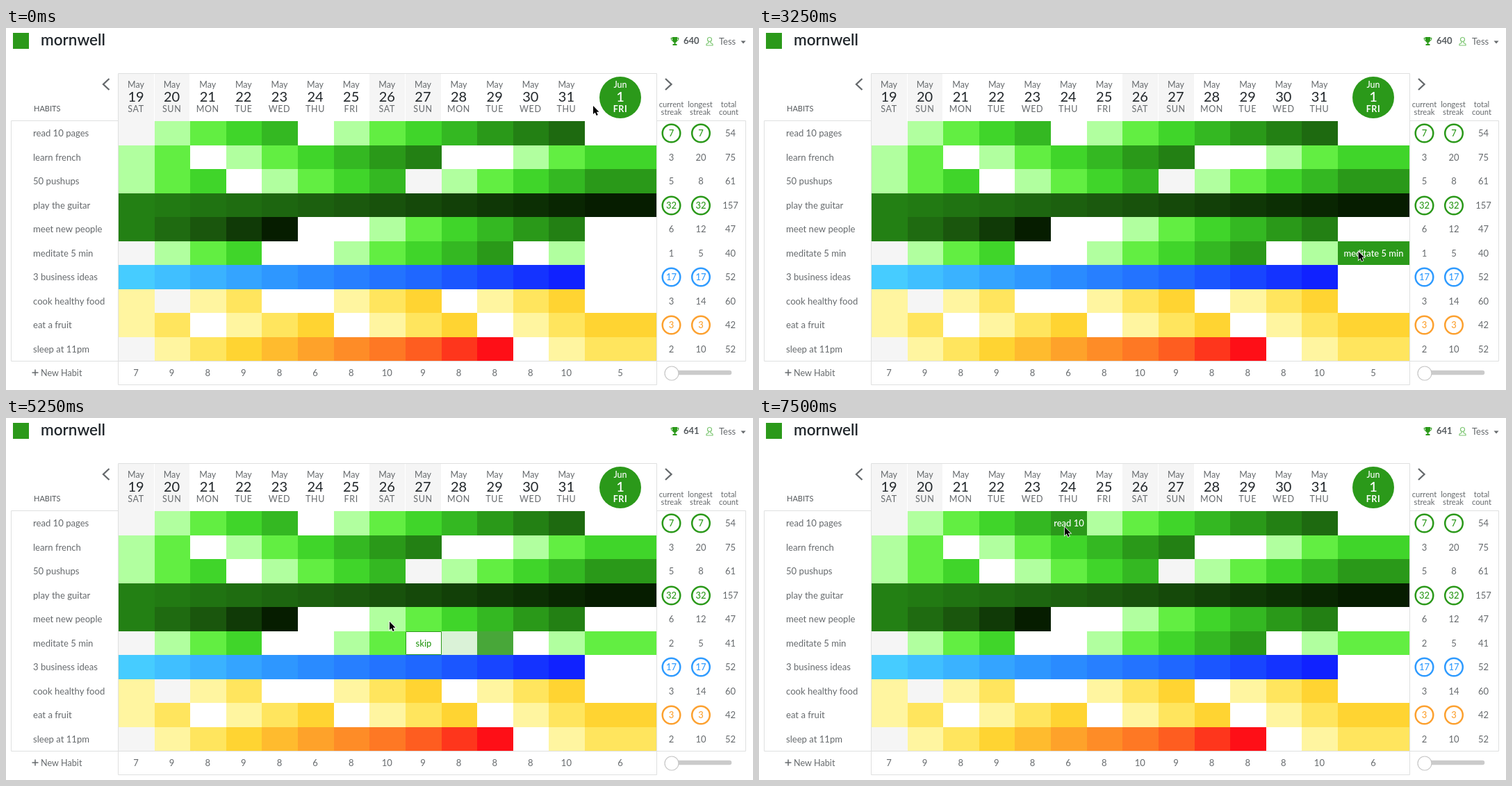
An HTML page with a canvas that plays this animation: 1075x521 px, repeating every 8000 ms.

```html
<!DOCTYPE html>
<html lang="en">
<head>
<meta charset="utf-8">
<title>Habit board</title>
<style>
html, body { margin: 0; width: 100%; height: 100%; overflow: hidden; background: #fff; }
canvas { display: block; }
</style>
</head>
<body>
<canvas id="stage" width="1075" height="521"></canvas>
<script>
const ctx = document.getElementById('stage').getContext('2d');
const LOOP = 8000, STEP = 250, FADE = 250, LAG = 100, CLICK = 3750, TODAY = 13;
const GREEN = '#2b991a', BLUE = '#2f9bff', ORANGE = '#fca130', GRAY = '#666a6d', LINE = '#dfe0e0';

// Evenly spaced colours through the given stops.
function ramp(stops, n) {
  const rgb = stops.map(s => [1, 3, 5].map(i => parseInt(s.substr(i, 2), 16)));
  return Array.from({ length: n }, (_, i) => {
    const p = i / (n - 1) * (stops.length - 1), k = Math.min(Math.floor(p), stops.length - 2);
    return `rgb(${rgb[k].map((v, c) => Math.round(v + (rgb[k + 1][c] - v) * (p - k)))})`;
  });
}
const fresh = ['#b1ff9f', '#62ee42', '#40d52a', '#34b822', '#2a9919', '#238014', '#1e6a10'];
const warm = ['#fff5a0', '#ffe55e', ...ramp(['#ffd432', '#fe9a29', '#fe6a22', '#fe0f17'], 8)];
const deep = ['#238014', '#1a560d', '#061d00'];
const blues = ['#46ccff', '#2e97ff', '#1f67ff', '#1022ff'];

// before: streak length already reached on the first day shown; carried: its colour stops.
const habits = [
  { label: 'read 10 pages', days: '.xxxx.xxxxxxx.', longest: 7, total: 54 },
  { label: 'learn french', days: 'xx.xxxxxx..xxx', longest: 20, total: 75 },
  { label: '50 pushups', days: 'xxx.xxxx.xxxxx', longest: 8, total: 61 },
  { label: 'play the guitar', days: 'xxxxxxxxxxxxxx', longest: 32, total: 157, before: 18, carried: deep },
  { label: 'meet new people', days: 'xxxxx..xxxxxx.', longest: 12, total: 47, before: 6, carried: deep },
  { label: 'meditate 5 min', days: '.xxx..xxxxx.x.', longest: 5, total: 40, clicked: true },
  { label: '3 business ideas', days: 'xxxxxxxxxxxxx.', longest: 17, total: 52, before: 4, carried: blues, accent: BLUE },
  { label: 'cook healthy food', days: 'x.xx..xxx.xxx.', longest: 14, total: 60, palette: warm, accent: ORANGE },
  { label: 'eat a fruit', days: 'xx.xxx.xxx.xxx', longest: 3, total: 42, palette: warm, accent: ORANGE },
  { label: 'sleep at 11pm', days: '.xxxxxxxxxx.xx', longest: 10, total: 52, palette: warm, accent: ORANGE },
];
const weekdays = ['SAT', 'SUN', 'MON', 'TUE', 'WED', 'THU', 'FRI'];

// Pointer route: time, x, y of the tip.
const route = [
  [500, 845, 112], [1500, 871, 201], [1650, 871, 240], [2000, 868, 272], [2250, 865, 279],
  [3000, 862, 321], [CLICK, 864, 323], [4250, 857, 378], [4750, 780, 387], [4900, 690, 338],
  [5113, 626, 316], [5250, 552, 293], [5750, 390, 203], [6000, 366, 181], [6250, 345, 177], [7000, 440, 157],
];

const colX = c => c > TODAY ? 936 : Math.round(162 + 51.615 * c);
const rowY = r => Math.round(134 + 34.5 * r);
const colMid = c => c < TODAY ? 187 + 51.615 * c : 884;
const isWeekend = c => c % 7 < 2;
const isDone = (habit, c, t) => habit.days[c] === 'x' || habit.clicked && c === TODAY && t >= CLICK;

function pointerAt(t) {
  const k = route.findIndex(p => p[0] > t);
  if (k < 1) return (k ? route[route.length - 1] : route[0]).slice(1);
  const [a, b] = [route[k - 1], route[k]], p = (t - a[0]) / (b[0] - a[0]);
  return [1, 2].map(i => a[i] + (b[i] - a[i]) * p);
}

function text(s, x, y, size = 13, color = GRAY, align = 'center', weight = 400, spacing = 0) {
  ctx.font = `${weight} ${size}px Lato, sans-serif`;
  ctx.letterSpacing = spacing + 'px';
  ctx.textAlign = align;
  ctx.fillStyle = color;
  ctx.fillText(s, x, y);
}
function rect(x, y, w, h, color) {
  ctx.fillStyle = color;
  ctx.fillRect(x, y, w, h);
}
function path(d, fill, stroke, width = 1) {
  const p = new Path2D(d);
  if (stroke) { ctx.strokeStyle = stroke; ctx.lineWidth = width; ctx.stroke(p); }
  if (fill) { ctx.fillStyle = fill; ctx.fill(p); }
}
function circle(x, y, r, fill, stroke, width) {
  ctx.beginPath();
  ctx.arc(x, y, r, 0, 7);
  if (fill) { ctx.fillStyle = fill; ctx.fill(); }
  if (stroke) { ctx.strokeStyle = stroke; ctx.lineWidth = width; ctx.stroke(); }
}

function drawTop(t) {
  rect(10, 7, 23, 23, GREEN);
  text('mornwell', 50, 25, 22.5, '#22282d', 'left', 600);
  path('M959 13h7v4q0 3-2.5 4v2h2v2h-6v-2h2v-2q-2.5-1-2.5-4z', GREEN);
  path('M959 14.5h-2q0 4 3 4M966 14.5h2q0 4-3 4', null, GREEN);
  text(t < CLICK ? 640 : 641, 975, 23, 13, '#555a5e', 'left', 700);
  circle(1012.5, 16.5, 3, null, '#7cc672', 1.2);
  path('M1011 19.5v2l-3 1.5v2h9v-2l-3-1.5v-2', null, '#7cc672', 1.2);
  text('Tess', 1026, 23.5, 13, GRAY, 'left');
  path('M1057.5 18.5h7l-3.5 4z', GRAY);
}

function drawHeader() {
  path('M148.5 73l-8.500 8 8.500 8M949 73l8.500 8-8.500 8', null, '#65696c', 2.3);
  text('HABITS', 40, 120, 11, '#55595c', 'left');
  [['current', 'streak', 957.5], ['longest', 'streak', 999], ['total', 'count', 1040]]
    .forEach(([a, b, x]) => { text(a, x, 114, 11.2); text(b, x, 125, 11.2); });
  circle(884, 100, 30, GREEN);
  for (let c = 0; c <= TODAY; c++) {
    const x = colX(c), mid = colMid(c), today = c === TODAY, soft = today ? '#fff' : GRAY;
    if (isWeekend(c) && !today) rect(x, 66, colX(c + 1) - x - 1, 68, '#f5f5f5');
    text(today ? 'Jun' : 'May', mid, today ? 85.5 : 86, 12.5, soft, 'center', today ? 500 : 400);
    text(today ? 1 : 19 + c, mid, 105.7, 20, today ? '#fff' : '#22272b', 'center', today ? 500 : 400);
    text(weekdays[c % 7], mid, 121.3, 12.5, soft, 'center', today ? 700 : 400, .6);
  }
}

function drawBorders() {
  path('M161.5 134V65.5H936.5V134M7.5 133.5H161.5M936.5 133.5H1064.5V479.5H7.5V133.5' +
    'M161.5 479.5V513.5H936.5V479.5M161.5 134V479.5M936.5 134V479.5', null, LINE);
}

function drawRow(habit, r, t) {
  const { label, days, longest, total, before = 0, carried, accent = GREEN, palette = fresh } = habit;
  const y = rowY(r), h = rowY(r + 1) - y, base = y + 21.5;
  const firstGap = (days + '.').indexOf('.'), old = carried && ramp(carried, firstGap);
  let streak = before, current = 0;
  text(label, 39, base, 13.1, GRAY, 'left');
  for (let c = 0; c <= TODAY; c++) {
    const done = isDone(habit, c, t);
    streak = done ? streak + 1 : 0;
    if (done || c < TODAY) current = streak;
    const blank = isWeekend(c) && c < TODAY ? '#f5f5f5' : '#fff';
    const color = !done ? blank : old && c < firstGap ? old[c] : palette[streak - 1];
    rect(colX(c), y, colX(c + 1) - colX(c), h, color);
  }
  const added = habit.clicked && t >= CLICK ? 1 : 0;
  [current, longest, total + added].forEach((n, i) => {
    const x = 957.5 + 42.5 * i, ring = current === longest && i < 2;
    if (ring) circle(x, y + 17.5, 12.8, null, accent, 2.5);
    text(n, x, base + .5, 13, ring ? accent : GRAY, 'center', ring ? 500 : 400);
  });
}

function drawFooter(t) {
  path('M37.5 496h9M42 491.5v9', null, GRAY, 1.5);
  text('New Habit', 50, 500.5, 12.6, GRAY, 'left');
  for (let c = 0; c <= TODAY; c++) text(habits.filter(habit => isDone(habit, c, t)).length, colMid(c), 501);
  ctx.lineCap = 'round';
  path('M958 496h83', null, '#cbcbcb', 6.5);
  ctx.lineCap = 'butt';
  circle(958, 497, 10, '#fff', '#c6c6c6', 1.2);
}

function drawHoverCell(r, c, cover) {
  const { label, days, accent = GREEN } = habits[r], empty = days[c] === '.';
  const x = colX(c), y = rowY(r), w = colX(c + 1) - x, h = rowY(r + 1) - y;
  ctx.globalAlpha = cover;
  rect(x, y, w, h, empty ? accent : '#fff');
  ctx.globalAlpha = 1;
  if (cover < 1) return;
  if (!empty) path(`M${x + .5} ${y + .5}h${w - 1}v${h - 1}h${1 - w}z`, null, accent);
  let caption = empty ? label : 'skip';
  ctx.font = '500 13px Lato, sans-serif';
  while (ctx.measureText(caption).width > w - 4) caption = caption.slice(0, caption.lastIndexOf(' '));
  text(caption, x + w / 2, y + 21.5, 13, empty ? '#fff' : accent, 'center', 500);
}

// The hovered cell trails the pointer; cells it has left fade back.
function drawHover(t) {
  const covers = new Map();
  for (let age = FADE; age >= 0; age -= 5) {
    const [x, y] = pointerAt(t - LAG - age);
    const r = habits.findIndex((_, i) => y >= rowY(i) && y < rowY(i + 1));
    let c = TODAY;
    while (c > 0 && x < colX(c)) c--;
    if (r >= 0) covers.set(r * 100 + c, 1 - age / FADE);
  }
  covers.forEach((cover, key) => {
    const r = Math.floor(key / 100), c = key % 100;
    if (!(habits[r].clicked && c === TODAY && t >= CLICK)) drawHoverCell(r, c, cover);
  });
}

function drawPointer(t) {
  const [x, y] = pointerAt(t);
  path(`M${x} ${y}v12l2.700-2.500 2 4.500 2.100-1-2-4.300h3.700z`, '#000', '#fff', 1.5);
}

function draw(now) {
  const t = Math.floor(now % LOOP / STEP) * STEP;
  rect(0, 0, 1075, 521, '#fff');
  drawTop(t);
  drawHeader();
  drawBorders();
  habits.forEach((habit, r) => drawRow(habit, r, t));
  drawFooter(t);
  drawHover(t);
  drawPointer(t);
}

const start = performance.now();
function tick() {
  draw(performance.now() - start);
  requestAnimationFrame(tick);
}
tick();
</script>
</body>
</html>
```
